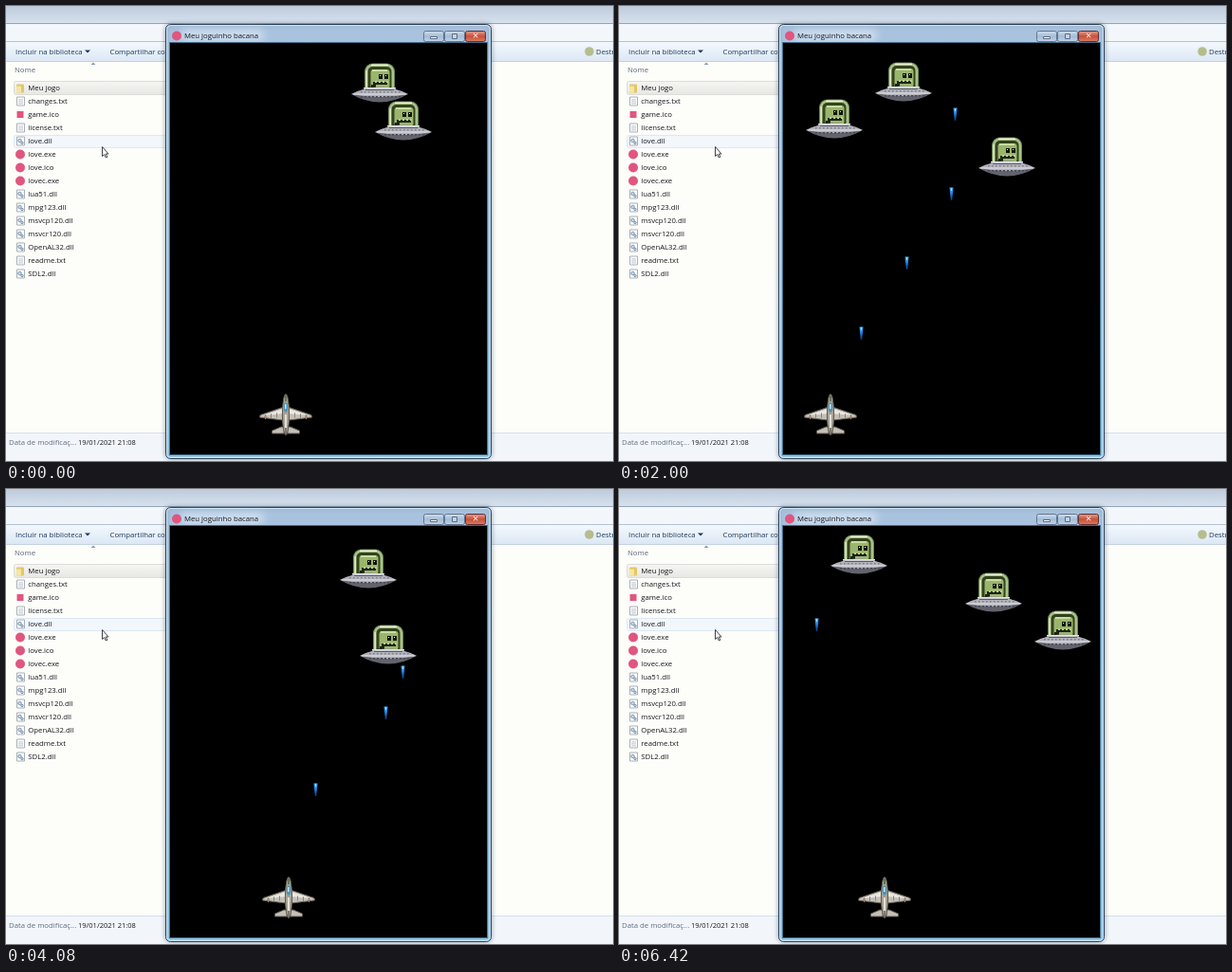
Write an HTML page with a canvas that moves like this. It is 640x480 px and loops after 6.51 s.

```html
<!DOCTYPE html>
<html lang="pt">
<head>
<meta charset="utf-8">
<style>
html, body { margin: 0; width: 100%; height: 100%; overflow: hidden; background: #fdfdfa; }
canvas { display: block; }
</style>
</head>
<body>
<canvas id="stage" width="640" height="480"></canvas>
<script>
const ctx = document.getElementById('stage').getContext('2d');
const LOOP = 6510, STEP = 1000 / 12;
const FALL = 0.079, RISE = 0.3;          // px per ms
const TOP = 37, MUZZLE = 395, SAUCER_H = 42, REACH = 33;

// Plane: [time, x], straight moves between the points
const path = [[0, 295], [540, 408], [817, 363], [1063, 354], [1342, 350], [2077, 208],
  [2580, 308], [3410, 418], [3500, 415], [3823, 326], [4093, 297], [5165, 294],
  [5420, 249], [5577, 208], [6010, 203], [LOOP, 298]];

function planeX(t) {
  const i = Math.max(1, path.findIndex(p => p[0] >= t));
  const [t0, x0] = path[i - 1], [t1, x1] = path[i];
  return x0 + (x1 - x0) * (t - t0) / (t1 - t0);
}

// Saucers come at a steady beat
const saucers = [419, 394, 364, 409, 227, 300, 320, 403, 269, 382, 236, 220, 468, 395, 253]
  .map((x, i) => ({ x, from: -800 + 505.5 * i, to: Infinity }));

// Bursts of fire: [first shot, gap, count]
const shots = [[79, 246, 5], [1342, 245, 4], [2387, 203, 2], [2857, 276, 3], [3553, 270, 3], [5350, 113, 3]]
  .flatMap(([first, gap, count]) => Array.from({ length: count }, (_, i) => {
    const from = first + gap * i;
    return { x: planeX(from), from, to: Infinity };
  }));

// A shot and a saucer vanish together where they meet
shots.flatMap(shot => saucers.map(ufo => ({
  shot, ufo, t: (MUZZLE - TOP - SAUCER_H + RISE * shot.from + FALL * ufo.from) / (RISE + FALL)
})))
  .filter(({ shot, ufo, t }) => Math.abs(shot.x - ufo.x) < REACH && t >= ufo.from && t >= shot.from)
  .sort((a, b) => a.t - b.t)
  .forEach(({ shot, ufo, t }) => {
    if (shot.to > t && ufo.to > t) shot.to = ufo.to = t;
  });

const files = ['Meu jogo', 'changes.txt', 'game.ico', 'license.txt', 'love.dll', 'love.exe',
  'love.ico', 'lovec.exe', 'lua51.dll', 'mpg123.dll', 'msvcp120.dll', 'msvcr120.dll',
  'OpenAL32.dll', 'readme.txt', 'SDL2.dll'];

function paint(color, line) {
  ctx.fillStyle = color;
  ctx.fill();
  if (line) { ctx.strokeStyle = line; ctx.lineWidth = 1; ctx.stroke(); }
}
function rect(x, y, w, h, color) {
  ctx.fillStyle = color;
  ctx.fillRect(x, y, w, h);
}
function poly(points, color, line) {
  ctx.beginPath();
  for (let i = 0; i < points.length; i += 2) ctx.lineTo(points[i], points[i + 1]);
  ctx.closePath();
  paint(color, line);
}
function round(x, y, w, h, r, color, line) {
  ctx.beginPath();
  ctx.roundRect(x, y, w, h, r);
  paint(color, line);
}
function oval(x, y, rx, ry, color, line) {
  ctx.beginPath();
  ctx.ellipse(x, y, rx, ry, 0, 0, 7);
  paint(color, line);
}
function lens(y, w, up, down, color) {
  ctx.beginPath();
  ctx.moveTo(-w, y);
  ctx.quadraticCurveTo(0, y - 2 * up, w, y);
  ctx.quadraticCurveTo(0, y + 2 * down, -w, y);
  paint(color);
}
function fade(y0, y1, ...colors) {
  const g = ctx.createLinearGradient(0, y0, 0, y1);
  colors.forEach((c, i) => g.addColorStop(i / (colors.length - 1), c));
  return g;
}
function text(s, x, y, color = '#15171c', size = 7.75) {
  ctx.font = size + "px 'Open Sans', 'Noto Sans', sans-serif";
  ctx.fillStyle = color;
  ctx.fillText(s, x, y);
}

function icon(name, y) {
  if (!name.includes('.')) {
    round(11, y - 4, 8, 9, 1, '#e3c765');
    round(11, y - 2, 5, 7, 1, '#f6e6a2');
  } else if (name === 'game.ico') {
    rect(11.5, y - 3.5, 7, 7, '#e0567f');
  } else if (/^love.*(exe|ico)$/.test(name)) {
    oval(15, y, 5, 5, '#e0567f');
  } else {
    round(11.5, y - 4.5, 8, 9, 0, '#fbfcfd', '#a9b0b8');
    if (name.endsWith('txt')) {
      for (let i = -2; i < 4; i += 2) rect(13, y + i, 5, 0.8, '#b4bac2');
    } else {
      oval(14.5, y - 0.5, 1.7, 1.7, '#d5e0ea', '#7893ad');
      oval(17, y + 2, 1.2, 1.2, '#d5e0ea', '#7893ad');
    }
  }
}

function explorer() {
  const ink = '#1e395b';
  rect(0, 0, 640, 480, '#fdfdfa');
  rect(0, 0, 640, 18, fade(0, 18, '#bccbdc', '#d6e1ed'));
  rect(0, 18, 640, 1, '#94a5b8');
  rect(0, 19, 640, 18, '#f3f7fb');
  rect(0, 37, 640, 1, '#b4c3d4');
  rect(0, 38, 640, 20, fade(38, 58, '#f3f8fd', '#dce8f5'));
  rect(0, 58, 640, 1, '#c3d2e4');
  text('Incluir na biblioteca', 10, 51, ink);
  poly([83, 46.5, 89, 46.5, 86, 49.5], ink);
  text('Compartilhar com', 109.5, 51, ink);
  oval(615, 48, 4.8, 4.8, '#b5bd8c');
  text('Destruir', 622, 51, ink);

  text('Nome', 9, 70, '#5a6577');
  poly([89.5, 62, 94.5, 62, 92, 59.5], '#8a9bae');
  round(8.5, 79.5, 170, 14, 2, fade(79, 94, '#f6f6f4', '#e6e6e3'), '#dcdcd9');
  round(8.5, 136.5, 170, 13, 2, '#f2f7fc', '#dce9f6');
  files.forEach((name, i) => {
    icon(name, 86.5 + 14 * i);
    text(name, 23.3, 89.2 + 14 * i);
  });

  rect(0, 450, 640, 30, '#f2f6fb');
  rect(0, 450, 640, 1, '#d5dfeb');
  text('Data de modificaç...', 3, 463.3, '#5f6c7e');
  text('19/01/2021 21:08', 76, 463.3, '#15171c', 7.5);

  poly([101.5, 148.5, 101.5, 158.5, 103.7, 156.5, 105.3, 160, 106.8, 159.3, 105.2, 156, 108, 156],
    '#fff', '#3f4348');
}

function gameWindow() {
  ctx.save();
  ctx.shadowColor = 'rgba(40,55,75,.45)';
  ctx.shadowBlur = 5;
  round(168.5, 19.5, 343, 458, 5, fade(19, 478, '#a9c2de', '#a3c8e8', '#98cdec'), '#2c4056');
  ctx.restore();
  round(169.5, 20.5, 341, 456, 4, 'transparent', '#cfeaf8');
  ctx.save();
  ctx.filter = 'blur(4px)';
  round(184, 25, 88, 12, 5, 'rgba(240,247,254,.55)');
  ctx.restore();
  oval(180, 31.5, 5, 5, '#e0567f');
  text('Meu joguinho bacana', 188, 34.3);

  const glass = fade(26, 38, '#d3e1f0', '#a4bcd6', '#c2d6ea');
  const red = fade(26, 38, '#e5a592', '#c9503a', '#dc8063');
  [glass, glass, red].forEach((fill, i) =>
    round(440.5 + 22 * i, 26.5, 21, 11, 2, fill, i < 2 ? '#60758e' : '#5b3035'));
  round(447.5, 32.5, 7, 2, 0, '#fff', '#5d6c7e');
  round(470.5, 29.5, 5, 5, 0, '#c2d2e4', '#5d6c7e');
  text('×', 492, 35.2, '#fff', 11);

  rect(172, 38, 336, 436, '#3f6d8a');
  rect(173, 39, 334, 434, '#000');
}

function drawSaucer(x, y) {
  ctx.save();
  ctx.translate(x, y);
  // dome
  round(-15.5, 1, 31, 28, [8, 8, 0, 0], '#a9c288', '#6f875a');
  round(-12.5, 4, 25, 25, [5, 5, 0, 0], '#34421f');
  rect(-9, 1.5, 18, 1.5, '#e6f2cf');
  rect(-14.5, 8, 1.5, 18, '#dcebc2');
  // pilot
  round(-9.5, 7, 20, 20, 3, '#9ab66c');
  rect(-8, 7, 16, 2, '#c8dca2');
  for (const eye of [-1, 5]) {
    rect(eye, 12, 4, 5, '#10150a');
    rect(eye + 1, 13, 1, 1, '#e8f2d2');
  }
  rect(-7, 20, 15, 3, '#1c2511');
  for (let i = -5; i < 8; i += 4) rect(i, 19, 2, 2, '#b9cf8e');
  rect(-9, 23, 5, 4, '#1c2511');
  // disc
  lens(33, 30, 7.5, 8.5, '#63636e');
  lens(33, 30, 7.5, 3, '#b2b2ba');
  rect(-17, 26, 34, 1.5, '#e3e3ea');
  rect(-15, 28, 30, 1, '#5a5a66');
  rect(-28, 32.5, 56, 1, '#e6e6ee');
  for (let i = -20; i <= 20; i += 4) {
    rect(i, 30, 1.5, 1.5, '#7c7c88');
    rect(i, 35, 2, 1.5, '#484852');
  }
  ctx.restore();
}

function drawPlane(x) {
  ctx.save();
  ctx.translate(x, 409);
  const edge = '#5d574e', skin = '#c4c0b8';
  for (const side of [-1, 1]) {
    ctx.save();
    ctx.scale(side, 1);
    poly([2, 14, 8, 16, 27, 22.5, 27.5, 25, 3, 28], skin, edge);
    poly([3, 16, 25, 23, 3, 21], '#ebe8e2');
    for (let i = 9; i < 24; i += 6) rect(i, 19 + i / 7, 1, 5, '#8c857a');
    rect(20, 23, 3, 1.5, '#b98672');
    poly([1, 35, 5, 35, 14.5, 39, 14.5, 42, 2, 42], skin, edge);
    ctx.restore();
  }
  oval(0, 22, 3.6, 21.5, '#a8a297', edge);
  rect(-1, 2, 2, 6, '#66755a');
  rect(-1, 22, 2, 14, '#e4e0d8');
  oval(0, 14.5, 2.2, 5, '#4b93b8');
  rect(-1, 11, 1.5, 5, '#bfe6f5');
  rect(-0.5, 36, 1, 8, '#534d44');
  ctx.restore();
}

function drawShot(x, y) {
  poly([x - 2, y - 6.5, x + 2, y - 6.5, x + 0.7, y + 7, x - 0.7, y + 7],
    fade(y - 7, y + 7, '#48b0fa', '#1f80e6', '#0b3a78'));
  rect(x - 0.5, y - 6, 1, 3, '#a6dcff');
}

function draw(t) {
  const live = item => t >= item.from && t < item.to;
  explorer();
  gameWindow();
  ctx.save();
  ctx.beginPath();
  ctx.rect(173, 39, 334, 434);
  ctx.clip();
  for (const s of shots.filter(live))
    drawShot(Math.round(s.x) + 0.5, Math.round(MUZZLE - RISE * (t - s.from)));
  for (const s of saucers.filter(live))
    drawSaucer(s.x, Math.round(TOP + FALL * (t - s.from)));
  drawPlane(Math.round(planeX(t)));
  ctx.restore();
}

const start = performance.now();
function tick() {
  const t = (performance.now() - start) % LOOP;
  draw(Math.floor((t + 3.5) / STEP) * STEP);   // 12 pictures a second
  requestAnimationFrame(tick);
}
tick();
</script>
</body>
</html>
```
